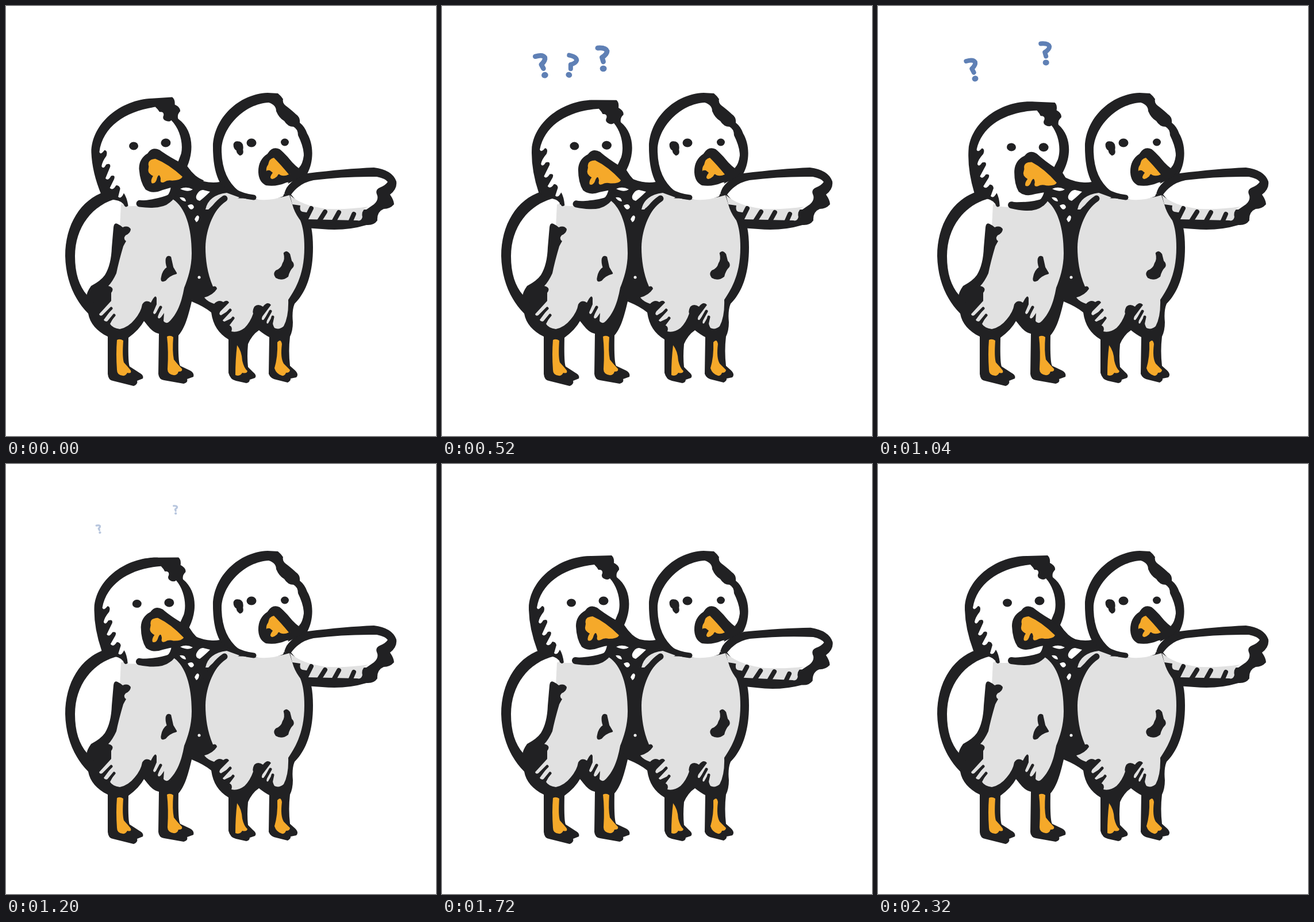
An HTML page that plays this animation: 748x748 px, repeating every 4000 ms.

```html
<!DOCTYPE html>
<html>
<head>
<meta charset="utf-8">
<style>
html, body { margin: 0; height: 100%; overflow: hidden; background: #fff; }
svg { display: block; width: 100vw; height: 100vh; }
.k { fill: #212123; }
.w { fill: #fff; }
.g { fill: #e1e1e1; }
.o { fill: #f5a92a; }
.line { fill: none; stroke: #212123; stroke-linecap: round; stroke-linejoin: round; }
.blot { stroke: #212123; stroke-width: 2.5; stroke-linejoin: round; }
#ask { fill: #5f80b5; }
#ask path { fill: none; stroke: #5f80b5; stroke-width: 8; stroke-linecap: round; stroke-linejoin: round; }
</style>
</head>
<body>
<svg viewBox="0 0 748 748">
  <defs>
    <g id="ask"><path d="M-8-17Q5-18 7-12Q7-7-1-2L1 5"/><ellipse cx="1" cy="16" rx="5.5" ry="5"/></g>
  </defs>

  <!-- bodies -->
  <g class="k">
    <path d="M172 323C130 337 103 380 103 435C104 475 118 510 143 535C146 552 158 566 177 575L177 640Q178 651 186 652L222 661Q230 658 228 652L238 648Q240 642 232 638L215 627Q212 620 213 577Q232 563 240 548C250 560 255 568 266 570L265 640Q266 650 275 651L309 657Q317 655 315 649L326 645Q328 638 320 634L303 626Q299 620 300 573C312 560 318 535 323 514L345 380L330 303L290 308Z"/>
    <path d="M300 480L323 514Q345 523 357 533C360 555 370 570 387 580L387 638Q390 650 400 652L418 656Q424 655 424 650L433 647Q437 643 430 637L421 628Q419 610 421 588Q428 572 440 564Q450 572 458 576L457 640Q460 648 470 650L490 655Q496 652 495 648L505 646Q510 641 503 634L494 626Q491 600 494 575Q499 565 499 550Q497 530 502 518C520 500 534 470 534 420Q534 400 531 385L515 345L490 328L400 310L372 306Q350 310 325 298L300 312Z"/>
  </g>
  <path class="k wing" d="M484 326Q486 316 497 306Q508 295 525 291Q590 283 640 281Q672 285 679 305Q681 318 668 328Q675 338 675 345Q668 353 657 353Q645 358 646 373Q640 382 627 381Q590 392 550 388Q535 387 522 386L505 352L492 332Z"/>

  <path class="w" d="M196 334C150 345 120 385 120 435C120 465 127 487 141 503L170 485L200 420L205 340Z"/>
  <path class="g" d="M200 345L228 345Q262 354 290 336C312 350 323 385 323 430C323 455 316 475 310 490C306 512 300 532 286 547Q279 555 274 548L275 534L270 541Q265 546 264 541L270 521L262 533Q257 539 256 533L262 519L262 508Q260 500 252 516Q243 510 237 519Q235 532 224 545Q213 559 198 562Q185 560 181 553L189 538L178 548Q172 550 170 546L184 527L170 537Q163 541 162 536L183 513L177 488L198 385Z"/>
  <path class="k" d="M187 385Q188 376 194 379Q200 382 203 385Q212 381 217 388Q217 395 208 399Q203 405 209 409Q206 414 204 418Q196 445 192 465Q185 480 178 487Q190 490 183 499L183 512L163 525L140 506Q140 498 148 487Q165 478 172 468Q183 450 184 420Z"/>
  <path class="g" d="M384 334L430 335Q465 338 493 329L498 345Q502 360 512 373Q519 390 519 420C519 465 505 490 491 511Q492 540 483 557Q475 564 467 560Q462 552 464 538L456 552Q452 554 454 546L461 529L448 546Q443 547 446 540L461 520Q455 513 447 523Q438 517 432 523Q428 530 430 535Q425 550 415 560Q403 569 392 566Q395 558 388 555L397 541L380 549Q375 548 378 542L392 527L374 538Q369 537 373 531L388 516Q385 510 378 515Q370 510 362 518Q350 514 345 507Q360 503 367 492Q366 486 360 488C350 465 347 440 347 420C348 385 362 355 384 334Z"/>
  <path class="line" stroke-width="5" d="M164 545L183 526M174 555L188 538M260 541L269 524M376 544L390 529M386 555L395 543M450 549L460 531M461 555L464 541"/>
  <g class="k blot">
    <path d="M279 440Q281 434 286 437Q288 446 290 455L296 465Q284 468 277 477Q269 481 271 472Q273 460 281 455Q278 447 279 440Z"/>
    <path d="M484 430Q488 425 493 432Q495 440 496 444Q501 449 499 453Q492 460 490 470Q480 478 470 472Q465 466 470 461Q480 457 482 448Q487 441 484 430Z"/>
  </g>
  <g class="o">
    <path d="M193 581Q198 578 204 582Q202 610 205 620Q214 630 217 634Q219 640 211 638Q208 644 203 643Q193 642 193 633Q191 605 193 581Z"/>
    <path d="M280 575Q286 572 291 576Q289 600 292 615Q300 625 306 631Q308 636 300 636Q298 643 291 642Q281 640 281 632Q283 600 280 575Z"/>
    <path d="M402 590Q410 600 411 617Q414 630 420 635Q419 640 411 638Q407 645 399 642Q399 615 402 590Z"/>
    <path d="M472 585Q478 578 480 588Q477 612 483 622L494 633Q494 638 487 638Q485 644 480 643Q470 640 467 630Q473 610 472 585Z"/>
  </g>

  <g class="wing">
    <path class="w" d="M496 328Q510 308 535 303Q590 296 645 297Q660 300 664 306Q660 312 650 316Q641 320 646 330Q648 338 640 345L627 354L560 356L512 347Z"/>
    <path class="g" d="M494 329Q515 348 560 353Q600 354 630 349Q617 355 620 367Q618 375 611 373L525 371L529 360L516 358Q510 357 512 347L498 345Z"/>
    <path class="line" stroke-width="8" d="M531 352L521 372M555 358L543 377M579 359L569 377M605 362L598 378"/>
  </g>

  <!-- right head -->
  <g id="headR">
    <path class="k" d="M372 307Q360 285 360 245C361 195 405 153 455 151L473 152Q478 156 482 162Q480 170 490 176Q500 184 504 188Q512 193 511 203Q520 210 524 222C535 240 536 270 524 292L500 304L440 336Q400 340 372 307Z"/>
    <path class="w" d="M405 322Q375 298 375 250C376 210 415 170 457 168Q470 172 470 183Q475 195 484 200Q490 210 500 210Q508 214 508 225Q518 245 518 260Q516 275 510 281L492 305Q487 318 482 331Q460 340 434 336Z"/>
    <path class="line" stroke-width="9" d="M374 300Q393 329 431 333"/>
    <path class="k" d="M439 290Q438 268 455 257Q463 243 476 249Q487 258 498 272Q510 285 521 288Q505 306 488 307Q470 315 452 312Q440 306 439 290Z"/>
    <path class="o" d="M456 276Q458 265 466 264Q478 276 492 293Q484 297 477 294Q474 290 472 296Q464 303 461 300Q458 298 464 290L459 286Q453 285 453 288Q452 281 456 276Z"/>
    <path class="k blot" d="M397 240Q399 235 406 237Q413 240 411 250Q413 258 407 259Q402 256 402 251Q396 247 397 240Z"/>
    <ellipse class="k" cx="427" cy="238" rx="8.5" ry="7.5"/>
    <ellipse class="k" cx="485" cy="237" rx="7" ry="6.5"/>
  </g>

  <!-- left head -->
  <g id="headL">
    <path class="k" d="M166 325Q151 285 151 250C153 200 205 160 260 160L295 159Q300 163 299 172Q309 177 308 184Q302 190 304 197C328 215 331 250 317 280Q330 300 345 306L330 315Q300 317 294 322Q290 335 275 345L212 345Q207 350 204 342Q198 334 180 333Z"/>
    <path class="w" d="M165 250C172 205 215 180 265 175Q270 180 272 184Q280 183 279 190Q276 196 281 199Q288 203 292 199C306 214 312 240 307 258L302 270L288 300L286 327Q265 336 232 337L228 346L212 346Q210 330 205 323Q200 334 195 329L199 315Q198 309 192 309Q186 319 181 313L189 298Q192 290 184 292Q178 302 174 296L183 276Q184 269 176 272Q171 281 168 275Q169 267 177 257Q180 248 174 247Q167 256 165 250Z"/>
    <path class="line" stroke-width="12" d="M232 342Q268 348 281 337Q289 332 292 321"/>
    <path class="k" d="M233 282Q233 264 249 255Q257 243 270 250Q285 262 305 273Q322 295 345 306Q330 318 300 314Q285 316 272 320Q255 327 243 318Q234 305 233 282Z"/>
    <path class="o" d="M250 278Q247 266 262 265Q285 275 308 298Q305 304 290 304Q282 302 276 306Q268 309 270 300Q268 289 264 298Q261 310 254 307Q252 302 257 295Q248 290 249 284Z"/>
    <ellipse class="k" cx="225" cy="241.5" rx="8" ry="7"/>
    <ellipse class="k" cx="281" cy="238" rx="8.5" ry="7.5"/>
  </g>

  <!-- feathers where the birds touch -->
  <path class="g" d="M347 354Q352 329 384 325L406 333L395 340L384 335Q362 342 352 354Z"/>
  <path class="line" stroke-width="11" d="M380 335Q362 347 349 374"/>
  <g class="w">
    <path d="M303 318Q314 313 325 319Q317 325 303 318Z"/>
    <path d="M331 330Q336 319 343 320L355 323Q345 333 337 339Q329 337 331 330Z"/>
    <path d="M302 333Q312 331 313 340Q306 340 302 333Z"/>
    <path d="M316 347Q325 342 327 350Q322 359 316 347Z"/>
    <path d="M328 371Q333 360 336 367Q335 375 331 376Z"/>
    <circle cx="336" cy="472" r="2.5"/>
  </g>
  <g id="marks"></g>
</svg>
<script>
const LOOP = 4000, STEP = 40;
const $ = id => document.getElementById(id);
const wings = document.querySelectorAll('.wing');
const mix = (a, b, p) => a + (b - a) * p;
const clamp = p => Math.max(0, Math.min(1, p));
const bump = p => p > 0 && p < 1 ? Math.sin(Math.PI * p) ** 2 : 0;

// time, x, y, tilt of the left head
const nod = [
  [0, -3, 1, -2], [320, 2, 1, 0], [640, 7.5, 4.5, 3.5],
  [1080, 7, 6, 4], [1280, 0, 0, 0], [LOOP, 0, 0, 0]
];

// position at 320 ms, velocity per ms, tilt, start and end of life
const marks = [
  { x: 178, y: 101, vx: -.0185, vy: .0138, tilt: -12, on: 270, off: 1140 },
  { x: 227, y: 107, vx: -.0136, vy: -.0145, tilt: 16, on: 160, off: 860 },
  { x: 275, y: 95, vx: .0225, vy: -.0175, tilt: 0, on: 294, off: 1140 }
];
$('marks').innerHTML = marks.map(() => '<use href="#ask"/>').join('');

function headPose(t) {
  const i = nod.findIndex(k => k[0] > t);
  const a = nod[i - 1], b = nod[i];
  const p = (t - a[0]) / (b[0] - a[0]);
  return a.map((v, j) => mix(v, b[j], p));
}

function popScale(t, { on, off }) {
  const age = t - on;
  const grow = age < 140 ? 1.15 * clamp(age / 140) : mix(1.15, 1, clamp((age - 140) / 200));
  return grow * (1 - clamp((t - off) / 100));
}

function draw(t) {
  const [, x, y, tilt] = headPose(t);
  $('headL').setAttribute('transform', `translate(${x} ${y}) rotate(${tilt} 253 240)`);

  const n = 1.6 * bump((t - 1320) / 160);
  $('headR').setAttribute('transform', `translate(${n} ${n * .6})`);

  const wave = t > 1320 && t < 2320 ? 4.4 * bump((t - 1320) % 500 / 500) : 0;
  wings.forEach(w => w.setAttribute('transform', `rotate(${wave} 498 328)`));

  marks.forEach((m, i) => {
    const el = $('marks').children[i], s = popScale(t, m), dt = t - 320;
    el.setAttribute('transform',
      `translate(${m.x + m.vx * dt} ${m.y + m.vy * dt}) rotate(${m.tilt}) scale(${s})`);
    el.setAttribute('opacity', clamp(s * 1.1));
  });
}

const start = performance.now();
function tick() {
  const t = (performance.now() - start) % LOOP;
  draw(Math.floor(t / STEP) * STEP);
  requestAnimationFrame(tick);
}
tick();
</script>
</body>
</html>
```
